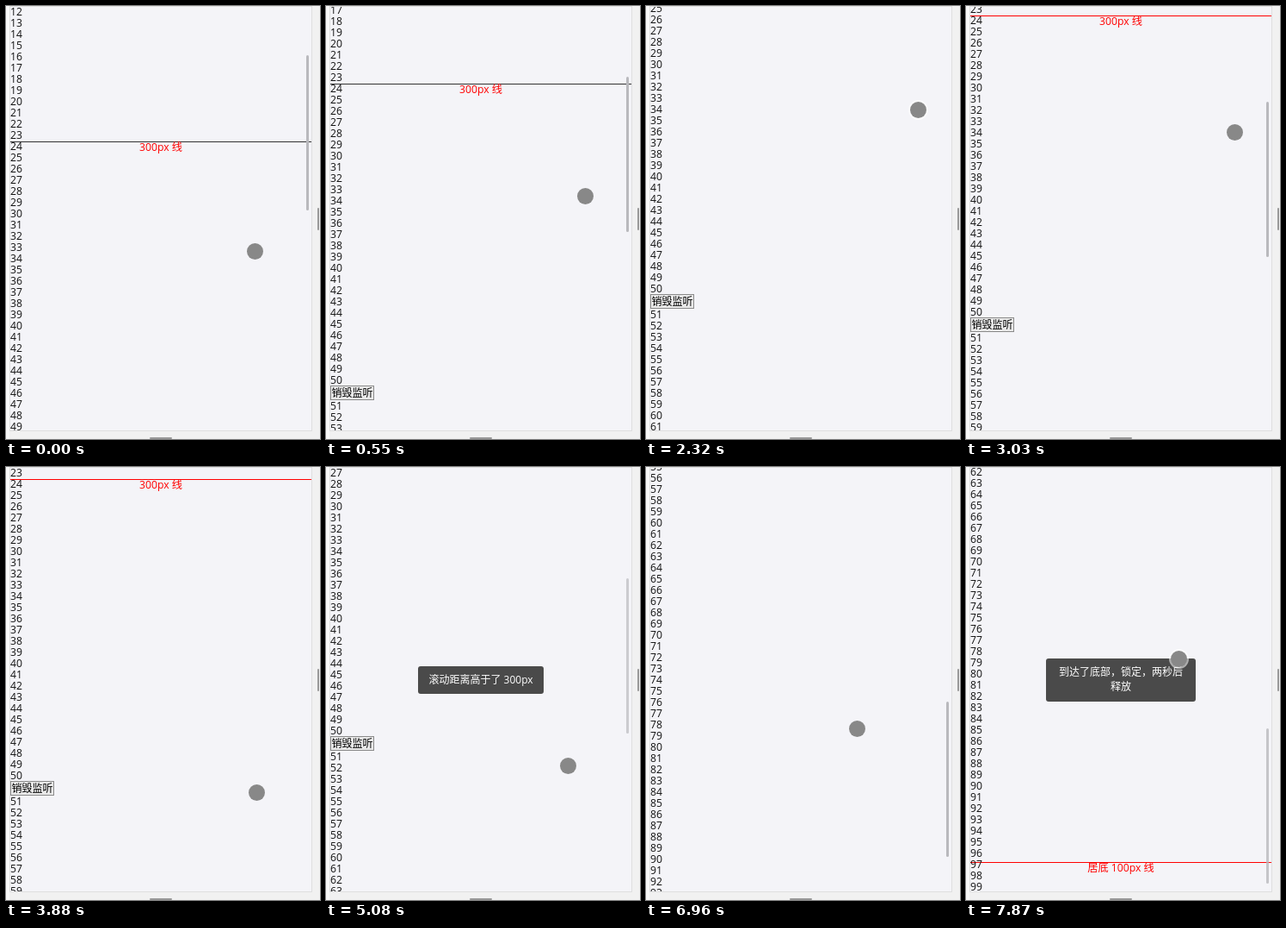
An HTML page for the animation above (8000 ms loop, 365 by 502 pixels).

```html
<!DOCTYPE html>
<html lang="zh">
<head>
<meta charset="utf-8">
<title>Scroll demo</title>
<style>
  html, body { margin: 0; width: 100%; height: 100%; overflow: hidden; }
  body {
    position: relative; background: #f1f1f1; color: #111;
    font: 12.2px/13px "Open Sans", "Noto Sans", "Noto Sans CJK SC", "Noto Sans CJK", sans-serif;
  }
  div { position: absolute; box-sizing: border-box; }
  #edge { left: 0; top: 0; width: 4px; height: 502px; background: #f8f8f8; }
  #frame { left: 4px; top: 0; width: 352px; height: 493px; border: 1px solid #dfdfdf; background: #f4f4f8; }
  #view { left: 5px; top: 1px; width: 350px; height: 491px; overflow: hidden; }
  #list { left: 0; top: 0; width: 350px; }
  #list div { white-space: nowrap; }
  #list .row { height: 13px; margin-top: -1px; }
  #list .label { width: 350px; color: #f00; text-align: center; }
  #list .line { width: 350px; height: 1px; background: #f00; }
  #list .button {
    top: 662px; width: 51px; height: 17px; line-height: 16px; text-align: center;
    border: 1px solid #8a8a8a; background: #e9e9e9; color: #000; font-size: 12px;
  }
  #thumb { left: 349px; width: 3px; height: 180px; border-radius: 1.5px; background: #b9b9bd; }
  .toast {
    background: #4a4a4a; color: #fff; border-radius: 3px; padding-top: 7px;
    font-size: 12px; line-height: 17px; text-align: center; white-space: nowrap;
  }
  #above { left: 107px; top: 231px; width: 146px; height: 32px; }
  #bottom { left: 93px; top: 222px; width: 174px; height: 50px; }
  #dot { margin: -9.5px; width: 19px; height: 19px; border-radius: 50%; background: #888; }
  #dot.idle { box-shadow: 0 0 0 2px rgba(255, 255, 255, .55); }
  .grip { background: #999; border-radius: 1px; }
</style>
</head>
<body>
<div id="edge"></div>
<div id="frame"></div>
<div id="view"><div id="list">
  <div class="line" id="upper" style="top:312px"></div>
  <div class="label" style="top:312px">300px 线</div>
  <div class="button">销毁监听</div>
  <div class="line" style="top:1281px"></div>
  <div class="label" style="top:1281px">居底 100px 线</div>
</div></div>
<div id="thumb"></div>
<div class="grip" style="left:362px;top:234px;width:2px;height:26px"></div>
<div class="grip" style="left:167px;top:500px;width:26px;height:2px"></div>
<div class="toast" id="above">滚动距离高于了 300px</div>
<div class="toast" id="bottom">到达了底部，锁定，两秒后<br>释放</div>
<div id="dot"></div>
<script>
const LOOP = 8000, TOAST = 1125;
const $ = id => document.getElementById(id);
const [list, upper, thumb, above, bottom, dot] =
  ['list', 'upper', 'thumb', 'above', 'bottom', 'dot'].map($);

for (let n = 0; n < 100; n++) {
  const row = document.createElement('div');
  row.className = 'row';
  row.textContent = n;
  row.style.top = n * 13 + (n > 50 ? 17 : 0) + 'px';
  list.append(row);
}

const linear = p => p;
const easeOut = p => p * (2 - p);
const clamp = v => Math.min(1, Math.max(0, v));

// Each gesture moves the finger by x, y and the list by scroll.
const gestures = [
  { from: 0, to: 1090, x: 24, y: -127, scroll: 132 },
  { from: 1090, to: 1450, x: 3, y: -38, scroll: 41 },
  { from: 2650, to: 3080, x: -4, y: 30, scroll: -30 },
  { from: 3080, to: 3880, x: -21, y: 227 },
  { from: 3960, to: 4800, x: -9, y: -31, scroll: 52 },
  { from: 5080, to: 5500, x: -8, y: 82 },
  { from: 5690, to: 6300, x: -13, y: -250, scroll: 338, ease: easeOut },
  { from: 6300, to: 6554, x: -17, y: 174 },
  { from: 6554, to: 7650, x: 3, y: -130, scroll: 135 }
];

function pose(t) {
  const p = { x: 289, y: 285, scroll: 156, thumb: 0 };
  for (const { from, to, x, y, scroll = 0, ease = linear } of gestures) {
    if (t < from) break;
    const k = ease(clamp((t - from) / (to - from)));
    p.x += x * k;
    p.y += y * k;
    p.scroll += scroll * k;
    // The scrollbar fades shortly after a scroll has ended.
    if (scroll) p.thumb = clamp(1 - (t - to - 100) / 600);
  }
  return p;
}

const within = (t, a, b) => t >= a && t < b;
const show = (el, on) => { el.style.visibility = on ? 'visible' : 'hidden'; };
const crossings = [1195, 3976], end = 7650;

function draw(now) {
  const t = now % LOOP, p = pose(t);
  list.style.top = -Math.round(p.scroll) + 'px';
  upper.style.background = t < crossings[0] ? '#333' : '#f00';
  thumb.style.top = Math.round(57 + (p.scroll - 156) * .368) + 'px';
  thumb.style.opacity = p.thumb;
  show(above, crossings.some(c => within(t, c, c + TOAST)));
  show(bottom, t >= end);
  dot.style.left = p.x + 'px';
  dot.style.top = p.y + 'px';
  dot.classList.toggle('idle', within(t, 1450, 2650) || t >= end);
}

const start = performance.now();
function loop() {
  draw(performance.now() - start);
  requestAnimationFrame(loop);
}
loop();
</script>
</body>
</html>
```
